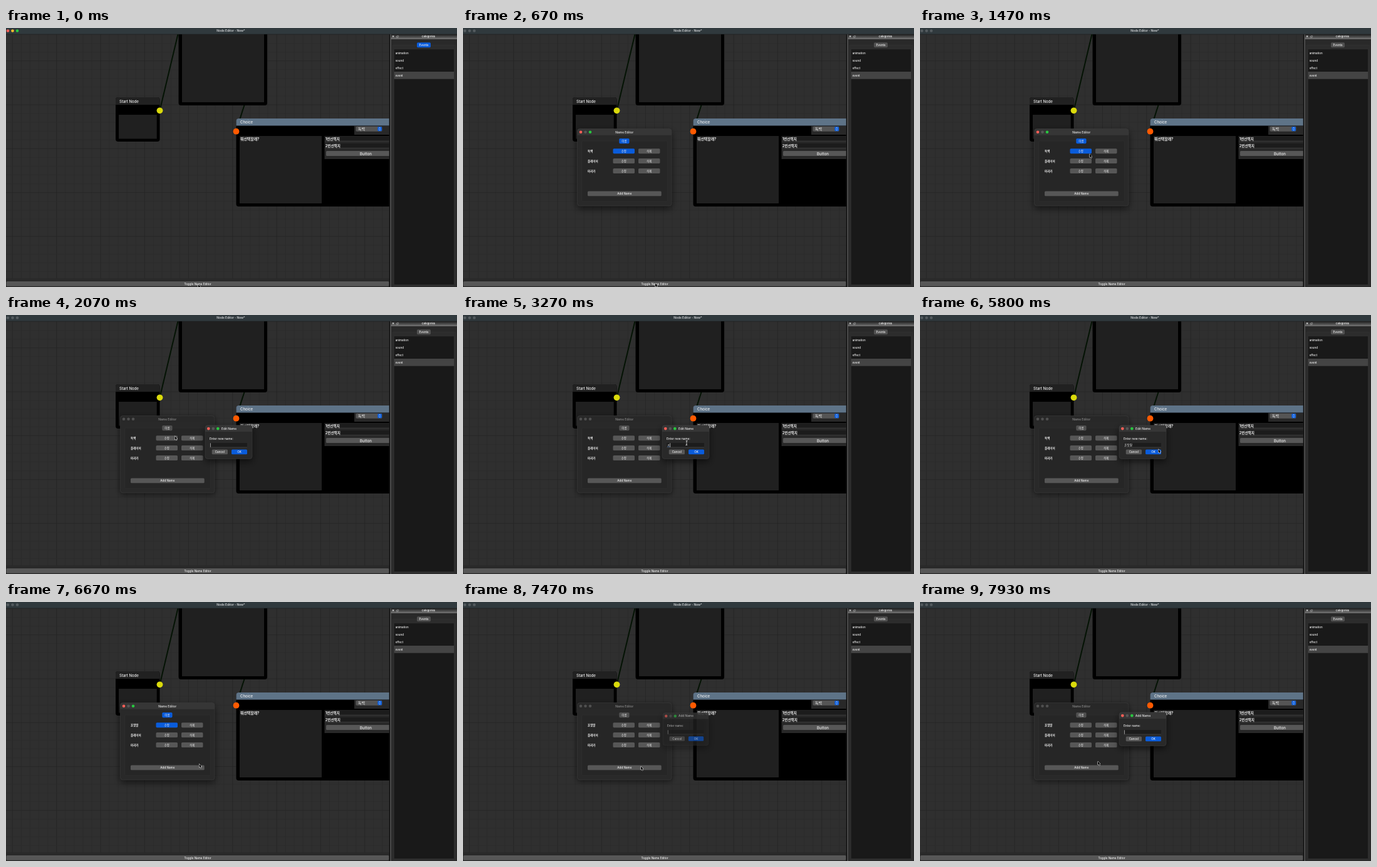
An HTML page with a canvas that plays this animation: 720 px wide and 415 px high, repeating every 8 s.

```html
<!DOCTYPE html>
<html lang="ko">
<head>
<meta charset="utf-8">
<title>Node Editor</title>
<style>
  html, body { margin: 0; height: 100%; overflow: hidden; background: #2f2f2f; }
  canvas { display: block; width: 720px; height: 415px; }
</style>
</head>
<body>
<canvas id="stage"></canvas>
<script>
const LOOP = 8000;
const canvas = document.getElementById('stage');
const ctx = canvas.getContext('2d');
const dpr = window.devicePixelRatio || 1;
canvas.width = 720 * dpr;
canvas.height = 415 * dpr;

const FONT = 'Inter, "Noto Sans CJK KR", "Noto Sans CJK", sans-serif';
const BLUE = '#0a5cdb', GREY = '#575757', WHITE = '#f2f2f2';
const LIGHTS = ['#ff5f57', '#febc2e', '#28c840'];

const clamp = v => Math.max(0, Math.min(1, v));
const ease = v => v * v * (3 - 2 * v);

function box(x1, y1, x2, y2, fill, r = 0, stroke) {
  ctx.beginPath();
  ctx.roundRect(x1, y1, x2 - x1, y2 - y1, r);
  ctx.fillStyle = fill;
  ctx.fill();
  if (stroke) {
    ctx.strokeStyle = stroke;
    ctx.lineWidth = 0.5;
    ctx.stroke();
  }
}

function dot(x, y, r, fill) {
  ctx.beginPath();
  ctx.arc(x, y, r, 0, 7);
  ctx.fillStyle = fill;
  ctx.fill();
}

function line(width, color, ...pts) {
  ctx.beginPath();
  for (let i = 0; i < pts.length; i += 2) ctx.lineTo(pts[i], pts[i + 1]);
  ctx.lineWidth = width;
  ctx.strokeStyle = color;
  ctx.stroke();
}

function text(s, x, y, size, { align = 'left', color = WHITE, weight = 500 } = {}) {
  ctx.font = `${weight} ${size}px ${FONT}`;
  ctx.textAlign = align;
  ctx.textBaseline = 'alphabetic';
  ctx.fillStyle = color;
  ctx.fillText(s, x, y + size * 0.36);
}

function button(s, x1, y1, x2, y2, fill = GREY, size = 4.6) {
  box(x1, y1, x2, y2, fill, 1.6);
  text(s, (x1 + x2) / 2, (y1 + y2) / 2, size, { align: 'center' });
}

function lights(x, y, colors) {
  colors.forEach((c, i) => dot(x + i * 7.5, y, 2.3, c));
}

function grid() {
  box(0, 10, 612, 401, '#2f2f2f');
  const step = 14.06;
  for (let i = 0; i < 44; i++) {
    const x = 10.3 + i * step, y = 10.6 + i * step;
    const color = k => k % 5 ? '#2a2a2a' : '#232323';
    line(0.6, color(i), x, 10, x, 401);
    if (y < 401) line(0.6, color(i + 2), 0, y, 612, y);
  }
}

function nodes() {
  line(2, '#041304', 246, 130, 274.5, 10);
  line(2, '#041304', 381, 122, 373, 147);

  box(275.5, 4, 417, 124, '#000', 4);
  box(281, 8, 412, 119, '#202020');

  box(175, 111, 245.5, 182, '#000', 4);
  box(175, 111, 245.5, 123, '#212121', [4, 4, 0, 0]);
  text('Start Node', 181, 117.6, 6);
  box(180, 139, 240.7, 177.5, '#202020');
  dot(245.5, 132.3, 4.9, '#dada0b');

  box(367.5, 145, 616, 286, '#000', 4);
  box(367.5, 145, 616, 156.5, '#5e7387', [4, 4, 0, 0]);
  text('Choice', 374, 151.2, 6);
  box(373, 173, 504, 281, '#202020');
  text('뭐선택할래?', 374, 178, 5.9, { weight: 700 });
  dot(367.5, 165.7, 4.9, '#ff5a00');

  box(556, 157, 612, 171, '#282828');
  box(558.5, 157.8, 600.5, 165.7, '#555', 1.6);
  text('독백', 562, 162, 6);
  box(593.3, 158.2, 600, 165.2, BLUE, 1.4);
  line(0.7, '#fff', 595.2, 161, 596.6, 159.5, 598, 161);
  line(0.7, '#fff', 595.2, 162.4, 596.6, 163.9, 598, 162.4);

  box(508.5, 173, 612, 210, '#282828');
  ['1번선택지', '2번선택지'].forEach((s, i) => {
    const y = 177.6 + i * 11.2;
    box(509, y - 4, 612, y + 3.6, '#1c1c1c');
    line(0.5, '#555', 509, y + 3.6, 612, y + 3.6);
    text(s, 509.8, y, 5.6, { weight: 700 });
  });
  box(511, 197, 616, 205, GREY, 1.6);
  text('Button', 574.5, 201.5, 6, { align: 'center' });
}

function dock(active) {
  box(611.7, 10.3, 720, 415, '#292929');
  box(611.9, 10.3, 613.4, 415, '#0c0c0c');
  box(613.4, 10.3, 614.8, 415, '#5c5c5c');
  const shade = ctx.createLinearGradient(0, 10, 0, 18);
  shade.addColorStop(0, '#1c1c1c');
  shade.addColorStop(1, '#767676');
  box(614.5, 10.3, 720, 18, shade);
  text('×', 618, 14, 5.5, { align: 'center', weight: 700 });
  box(623.4, 13.4, 625.6, 15.4, '#222', 0, '#ccc');
  box(624.4, 12.4, 626.6, 14.4, '#222', 0, '#ccc');
  text('Categories', 674.3, 14, 4.1, { align: 'center', weight: 600 });
  box(617, 27.3, 718, 413.5, '#2c2c2c', 1.5, '#373737');
  button('Events', 656, 23.3, 678, 31.2, active ? BLUE : '#505050', 4.7);
  box(619.3, 33.7, 715.5, 411.5, '#191919', 0, '#3a3a3a');
  box(619.5, 70, 715.3, 81.7, '#444');
  ['animation', 'sound', 'effect', 'event'].forEach((s, i) => text(s, 621.7, 40 + i * 12, 4.5));
}

function mainWindow(active) {
  grid();
  nodes();
  box(0, 0, 720, 10, '#30393d');
  line(0.6, '#1c1f21', 0, 10, 720, 10);
  lights(3, 4.5, active ? LIGHTS : Array(3).fill('#545b5f'));
  text('Node Editor - New*', 359, 4.5, 4.87, { align: 'center', weight: 600, color: '#d3d6d8' });

  box(0, 401, 612, 415, '#292929');
  button('Toggle Name Editor', 0.5, 406, 611.5, 413.7);
  dock(active);
}

// Panel with shadow and title bar; show runs from 0 (hidden) to 1 (open).
function panel(x1, y1, x2, y2, title, active, lightX, titleX, show, body) {
  if (show <= 0) return;
  const cx = (x1 + x2) / 2, cy = (y1 + y2) / 2, k = 0.92 + 0.08 * ease(show);
  ctx.save();
  ctx.globalAlpha = show;
  ctx.translate(cx, cy);
  ctx.scale(k, k);
  ctx.translate(-cx, -cy);
  ctx.shadowColor = 'rgba(0,0,0,.6)';
  ctx.shadowBlur = (active ? 12 : 9) * dpr;
  ctx.shadowOffsetY = (active ? 4 : 2) * dpr;
  box(x1, y1, x2, y2, '#292929', 4);
  ctx.shadowColor = 'transparent';
  box(x1, y1, x2, y1 + 10.3, active ? '#363636' : '#282828', [4, 4, 0, 0]);
  box(x1, y1, x2, y2, 'transparent', 4, '#414141');
  const off = '#505050';
  lights(lightX, y1 + 5.3, active ? [LIGHTS[0], '#565656', LIGHTS[2]] : [off, off, off]);
  text(title, titleX, y1 + 5.3, 4.9, { align: 'center', weight: 600, color: active ? '#d8d8d8' : '#808080' });
  body();
  ctx.restore();
}

function nameEditor(t, show, active) {
  panel(182.5, 161.5, 333, 285, 'Name Editor', active, 188, 257.7, show, () => {
    box(189.5, 181, 326.5, 278, '#262626', 2, '#333');
    button('이름', 249.3, 177, 265.5, 185.2, active ? BLUE : '#505050', 4.4);
    const names = [t < 6130 ? '독백' : '혼잣말', '플레이어', '마리카'];
    names.forEach((s, i) => {
      const y = 197.2 + i * 15.9;
      text(s, 199, y, 4.5, { weight: 600 });
      button('수정', 239.5, y - 4, 274, y + 4, active && !i ? BLUE : GREY, 4.4);
      button('삭제', 280, y - 4, 314.5, y + 4, GREY, 4.4);
    });
    button('Add Name', 199, 261.5, 316.7, 269.3);
  });
}

// Time of each edit and the text it leaves in the field
const KEYS = [
  [1800, ''], [3130, 'ㅊ'], [3600, ''],
  [4070, 'ㅎ'], [4200, '호'], [4400, '혼'], [4530, '혼ㅈ'], [4670, '혼자'],
  [4730, '혼잣'], [4870, '혼잣ㅁ'], [4930, '혼잣마'], [5100, '혼잣말'], [7450, '']
];

function nameDialog(t, show, title, label) {
  panel(318, 176.8, 393, 230.5, title, true, 323.3, 356, show, () => {
    text(label, 325, 198, 4.75);
    box(325.3, 205, 385, 212, '#1c1c1c');
    line(0.5, '#555', 325.3, 212, 385, 212);
    const [since, typed] = KEYS.filter(k => k[0] <= t).pop();
    text(typed, 326, 208.7, 4.7);
    const end = 326.4 + ctx.measureText(typed).width;
    if (typed === 'ㅊ') line(0.5, '#6aa5ff', 326, 211, end, 211);
    if ((t - since) % 1000 < 500) line(0.6, '#fff', end, 205.3, end, 211.7);
    button('Cancel', 328.7, 215.5, 354, 223.3);
    button('OK', 360, 215.5, 385, 223.3, BLUE);
  });
}

// Pointer stops: time, x, y
const PATH = [
  [0, 307, 411], [400, 307, 411], [600, 307, 409], [740, 307, 409], [900, 305, 387],
  [1550, 269.5, 194], [2230, 269.5, 194], [2600, 347, 198], [2850, 357, 205],
  [5270, 357, 205], [5720, 380.5, 215], [6180, 380.5, 215], [6640, 308.5, 259.5],
  [6690, 308.5, 259.5], [6870, 284, 263.5], [7480, 284, 263.5], [7780, 284, 255.5], [LOOP, 284, 255.5]
];

function pointer(t) {
  const i = PATH.findIndex(p => p[0] > t);
  const [t0, x0, y0] = PATH[i - 1], [t1, x1, y1] = PATH[i];
  const k = ease((t - t0) / (t1 - t0));
  ctx.save();
  ctx.translate(x0 + (x1 - x0) * k, y0 + (y1 - y0) * k);
  if (t > 2680 && t < 5420) {
    const beam = [-1.3, -3.6, 0, -3, 1.3, -3.6, 0, -3, 0, 3, -1.3, 3.6, 0, 3, 1.3, 3.6];
    line(1.3, '#222', ...beam);
    line(0.7, '#fff', ...beam);
  } else {
    ctx.beginPath();
    [[0, 0], [0, 5.6], [1.3, 4.4], [2.2, 6.5], [3.2, 6.1], [2.3, 4], [4, 3.9]].forEach(p => ctx.lineTo(...p));
    ctx.closePath();
    ctx.lineWidth = 1;
    ctx.strokeStyle = '#fff';
    ctx.stroke();
    ctx.fillStyle = '#000';
    ctx.fill();
  }
  ctx.restore();
}

function draw(now) {
  const t = now % LOOP;
  const fade = (open, close = Infinity) => clamp((t - open) / 170) * (1 - clamp((t - close) / 130));
  ctx.setTransform(dpr, 0, 0, dpr, 0, 0);
  ctx.lineJoin = 'round';
  mainWindow(t < 300);
  const dimmed = (t >= 1800 && t < 6130) || t >= 7370;
  nameEditor(t, fade(300), !dimmed);
  nameDialog(t, fade(1800, 6100), 'Edit Name', 'Enter new name:');
  nameDialog(t, fade(7370), 'Add Name', 'Enter name:');
  pointer(t);
}

const start = performance.now();
function tick() {
  draw(performance.now() - start);
  requestAnimationFrame(tick);
}
tick();
</script>
</body>
</html>
```
